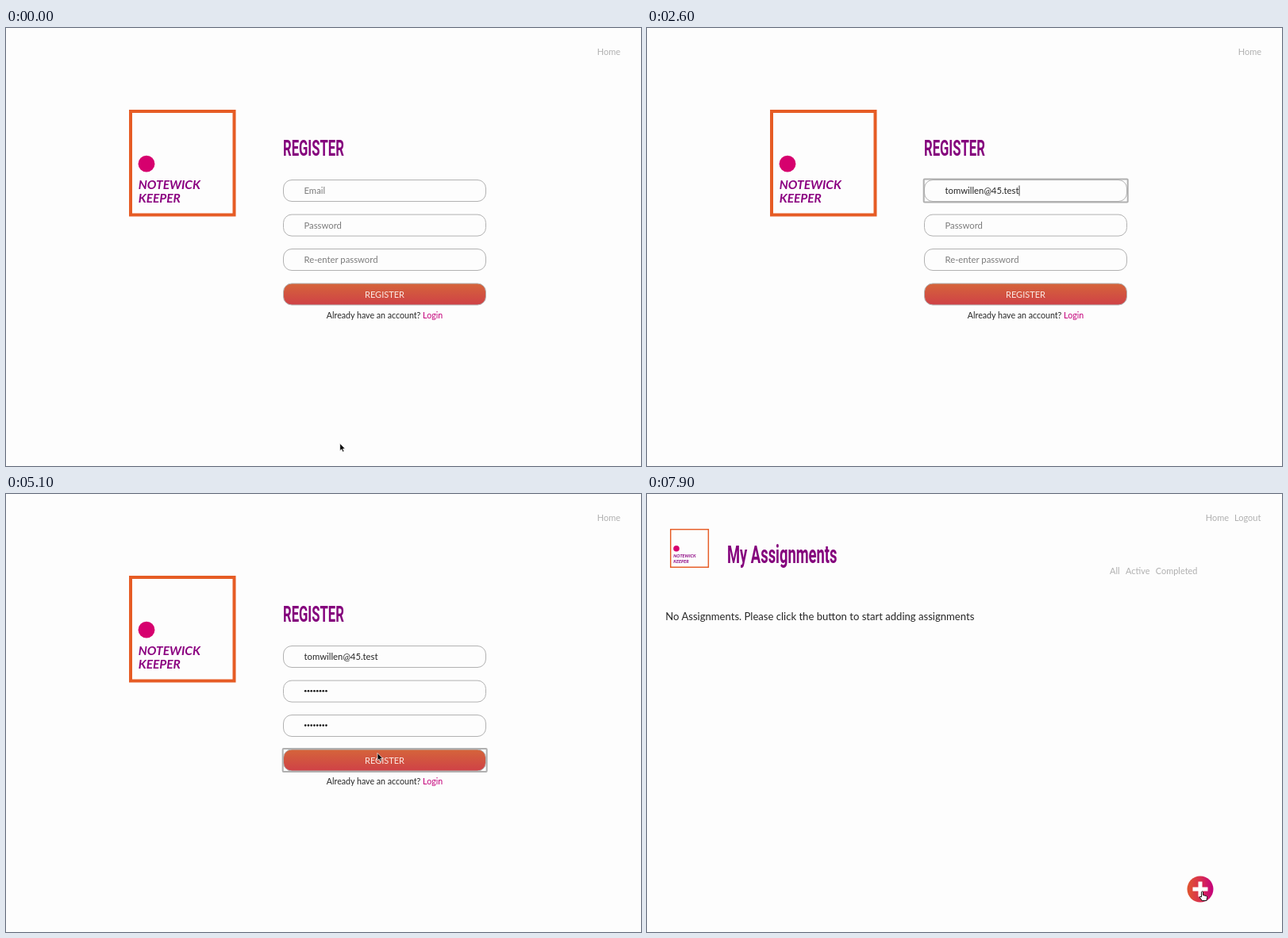
Animation of 800 by 552 pixels, one loop 8 s. Source, as an HTML page:

```html
<!DOCTYPE html>
<html lang="en">
<head>
<meta charset="utf-8">
<title>Register and log in</title>
<style>
  html, body { margin: 0; width: 100%; height: 100%; overflow: hidden; background: #fdfdfd; }
  svg { display: block; width: 100vw; height: 100vh; }
  text { font-family: Lato, "Open Sans", sans-serif; font-size: 11.3px; fill: #262626; white-space: pre; }
  .title { font-family: Roboto, "Liberation Sans", sans-serif; font-weight: 700; fill: #84007c; }
  .nav { font-size: 11px; fill: #b0b0b0; }
  .filter { font-size: 10.95px; fill: #b0b0b0; }
  .link { fill: #c4007a; }
  .hover { fill: #a8127c; }
  .hint { fill: #7c7c7c; }
  .note { font-size: 10.65px; text-anchor: middle; }
  .small { font-size: 9.3px; }
  .big { font-size: 13.08px; }
  .button { font-size: 11px; fill: #fbe9e4; text-anchor: middle; }
  .brand { font-size: 15.5px; font-weight: 700; font-style: italic; fill: #8b0080; }
</style>
</head>
<body>
<svg viewBox="0 0 800 552" xmlns="http://www.w3.org/2000/svg">
  <defs>
    <linearGradient id="warm" x2="0" y2="1">
      <stop stop-color="#d5653a"/><stop offset="1" stop-color="#cf4147"/>
    </linearGradient>
    <linearGradient id="round">
      <stop stop-color="#e0562f"/><stop offset=".5" stop-color="#d9304f"/><stop offset="1" stop-color="#c4007c"/>
    </linearGradient>
    <g id="brand">
      <rect x="2" y="2" width="130.5" height="130.5" fill="#fdfdfd" stroke="#e65c25" stroke-width="4"/>
      <circle cx="22" cy="68.2" r="10.4" fill="#d6006e"/>
      <text class="brand" x="11.7" y="99.5">NOTEWICK</text>
      <text class="brand" x="11.7" y="117">KEEPER</text>
    </g>
    <path id="arrow" d="M0 0V9.3L2.1 7.4 3.6 10.8 5.2 10.1 3.8 6.8H6.6Z" fill="#000" stroke="#fff" stroke-width=".7"/>
    <path id="hand" d="M-1 0Q0-1.2 1 0V4L5 5Q6.4 5.4 6.2 7L5.4 11H-.2L-3.4 6.6Q-3.2 5-1 6.4Z" fill="#fff" stroke="#000" stroke-width=".9"/>
  </defs>
  <g id="stage"></g>
</svg>
<script>
const LOOP = 8000, STEP = 100;
const USER = "tomwillen", DOMAIN = "@45.test", MEMBER = "selenabirov@mail.test";
const stage = document.getElementById("stage");
const pen = document.createElement("canvas").getContext("2d");

const clamp = (v, lo, hi) => Math.max(lo, Math.min(hi, v));
const typed = (t, start, step, max) => t < start ? 0 : clamp(Math.floor((t - start) / step) + 1, 0, max);
const text = (x, y, label, cls = "") => `<text x="${x}" y="${y}" class="${cls}">${label}</text>`;
const title = (x, y, size, label) =>
  `<text class="title" style="font-size:${size}px" transform="translate(${x} ${y}) scale(.6 1)">${label}</text>`;
const logo = (x, y, scale = 1) => `<use href="#brand" transform="translate(${x} ${y}) scale(${scale})"/>`;
const box = (y, fill) =>
  `<rect x="349.5" y="${y + .5}" width="255" height="27" rx="10.5" fill="${fill}" stroke="#b2b2b2"/>`;
const ring = y =>
  `<rect x="348.7" y="${y - .4}" width="257" height="29" rx="1" fill="none" stroke="#b0b0b0" stroke-width="2"/>`;

function textWidth(label) {
  pen.font = '11.3px Lato, "Open Sans", sans-serif';
  return pen.measureText(label).width;
}

function field(y, hint, { value = "", dots = 0, focus = false, fill = "#fdfdfd" }) {
  let out = box(y, fill);
  if (value) out += text(375.5, y + 18, value);
  else if (!dots) out += text(375.5, y + 18, hint, "hint");
  for (let i = 0; i < dots; i++)
    out += `<circle cx="${377.2 + 3.75 * i}" cy="${y + 13.6}" r="1.3" fill="#111"/>`;
  if (focus) {
    const x = 376 + (value ? textWidth(value) : dots * 3.75);
    out += ring(y) + `<path d="M${x} ${y + 7.5}v13" stroke="#111" stroke-width=".8"/>`;
  }
  return out;
}

function button(y, label, focus) {
  return box(y, "url(#warm)") + text(477, y + 18, label, "button") + (focus ? ring(y) : "");
}

const note = (y, lead, link) =>
  `<text x="477" y="${y}" class="note">${lead}<tspan class="link">${link}</tspan></text>`;

const homeOnly = () => text(744.8, 34, "Home", "nav");
const memberNav = hover => text(703.8, 34, "Home", "nav") + text(740, 34, "Logout", hover ? "nav hover" : "nav");

function registerPage(t) {
  const email = USER.slice(0, typed(t, 1000, 80, 9)) + DOMAIN.slice(0, typed(t, 1900, 100, 8));
  return homeOnly() + logo(155, 103) + title(349, 160.5, 27.8, "REGISTER")
    + field(191, "Email", { value: email, focus: t >= 800 && t < 2800 })
    + field(234.6, "Password", { dots: typed(t, 3150, 110, 8), focus: t >= 2800 && t < 4000 })
    + field(278, "Re-enter password", { dots: typed(t, 4050, 70, 8), focus: t >= 4000 && t < 5000 })
    + button(321.5, "REGISTER", t >= 5000)
    + note(366.3, "Already have an account? ", "Login");
}

function thanksPage(t) {
  return memberNav(t >= 5900) + logo(155, 103) + title(349, 160.5, 27.8, "THANKS FOR REGISTERING!")
    + text(349, 185, "A verification link has been sent to the email address you", "small")
    + text(349, 195, "used to register. Please verify your email before continuing.", "small");
}

function loginPage(t) {
  const fill = "#e6ecfb", clicked = t >= 7000;
  return homeOnly() + logo(155, 103) + title(349, 160.5, 27.8, "LOGIN")
    + field(191, "Email", { value: MEMBER, focus: !clicked, fill })
    + field(234.6, "Password", { dots: 8, fill })
    + button(278, "LOGIN", clicked)
    + note(323, "Not a member? ", "Register")
    + note(339.5, "", "Forgot Password?");
}

function assignmentsPage() {
  return memberNav(false) + logo(29, 43.9, .365) + title(101, 87, 30.6, "My Assignments")
    + text(583, 100.5, "All", "filter") + text(603, 100.5, "Active", "filter") + text(640.8, 100.5, "Completed", "filter")
    + text(23.3, 159, "No Assignments. Please click the button to start adding assignments", "big")
    + `<circle cx="697" cy="498" r="16.5" fill="url(#round)"/>`
    + `<path d="M687.5 498h19M697 488.5v19" stroke="#fff" stroke-width="5"/>`;
}

// Pointer stops: time, x, y
const route = [
  [0, 420.7, 523.5], [700, 440, 207], [4500, 440, 207], [5000, 468, 326.5], [5300, 468, 326.5],
  [5900, 746, 31.5], [6100, 746, 31.5], [6300, 742, 20], [6700, 473.5, 231.5],
  [6900, 480, 290], [7100, 480, 290], [7700, 699.5, 501.5], [8000, 699.5, 501.5]
];

function pointer(t) {
  if (t >= 1000 && t < 4600) return "";
  const i = route.findIndex((stop, n) => n && t < stop[0]);
  const [t0, x0, y0] = route[i - 1], [t1, x1, y1] = route[i];
  const p = (t - t0) / (t1 - t0), e = p * p * (3 - 2 * p);
  const x = x0 + (x1 - x0) * e, y = y0 + (y1 - y0) * e;
  const overAdd = t >= 7100 && Math.hypot(x - 697, y - 498) < 16.5;
  return `<use href="#${overAdd ? "hand" : "arrow"}" x="${x}" y="${y}"/>`;
}

function draw(t) {
  const page = t < 5300 ? registerPage : t < 6200 ? thanksPage : t < 7100 ? loginPage : assignmentsPage;
  stage.innerHTML = page(t) + pointer(t);
}

const begin = performance.now();
let last = -1;
function tick() {
  const t = Math.floor((performance.now() - begin) % LOOP / STEP) * STEP;
  if (t !== last) draw(last = t);
  requestAnimationFrame(tick);
}
tick();
</script>
</body>
</html>
```
